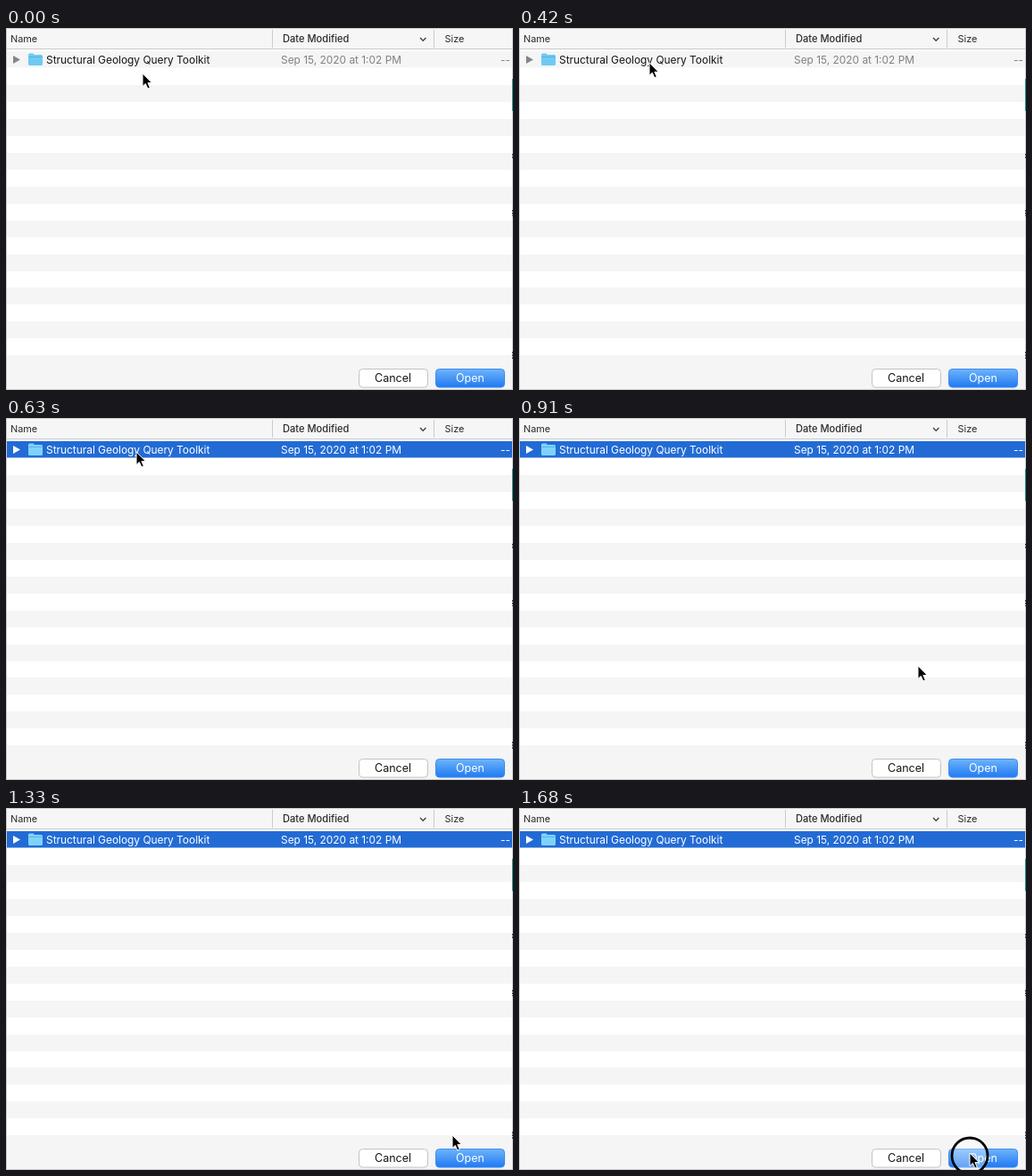
Write an HTML page that moves like this. It is 568 px wide and 406 px high and loops after 1.75 s.

```html
<!DOCTYPE html>
<html lang="en">
<head>
<meta charset="utf-8">
<title>Open folder dialog</title>
<style>
  html, body { margin: 0; width: 100%; height: 100%; overflow: hidden; background: #fff; }
  svg { display: block; font: 11.9px Inter, "Open Sans", sans-serif; fill: #151515; }
  .head { font-size: 10.9px; fill: #2b2b2b; }
  .sorted { font-size: 11.1px; font-weight: 500; }
  .button { font-size: 12.5px; text-anchor: middle; }
  .band { fill: #f5f5f5; }
  .arrow { fill: #858585; }
  .meta { fill: #808080; }
  .folder { fill: #6fcaf2; }
  .selected .band { fill: #226bd5; }
  .selected text, .selected .arrow { fill: #fff; }
  .selected .folder { fill: #7fd3fa; }
</style>
</head>
<body>
<svg width="568" height="406" viewBox="0 0 568 406">
  <defs>
    <linearGradient id="blue" x1="0" y1="0" x2="0" y2="1">
      <stop offset="0" stop-color="#6eb4fa"/>
      <stop offset="1" stop-color="#2079f3"/>
    </linearGradient>
  </defs>
  <rect width="568" height="406" fill="#fff"/>
  <g id="stripes"></g>

  <rect width="568" height="23" fill="#f6f6f6"/>
  <path d="M0 .5H568M0 23.5H568M298.5 2V22M479.5 2V22" stroke="#cbcbcb"/>
  <text class="head" x="5" y="16">Name</text>
  <text class="head sorted" x="310" y="16">Date Modified</text>
  <text class="head" x="491.5" y="16">Size</text>
  <path d="M464 11l3.2 3.3 3.2-3.3" fill="none" stroke="#444" stroke-width="1.4"/>

  <g id="row">
    <rect class="band" x="1" y="26" width="566" height="18.5"/>
    <path class="arrow" d="M8 31L16 35.5L8 40Z"/>
    <path class="folder" d="M25 30q0-1.5 1.5-1.5h4l1.5 1.5h7.5q1.5 0 1.5 1.5v9q0 1.500-1.500 1.500h-13q-1.500 0-1.500-1.500z"/>
    <path d="M25.500 32.500h15" stroke="#4aaedd" stroke-width=".8"/>
    <text x="45" y="40">Structural Geology Query Toolkit</text>
    <text class="meta" x="308" y="40">Sep 15, 2020 at 1:02 PM</text>
    <text class="meta" x="565" y="40" text-anchor="end">--</text>
  </g>

  <rect y="373" width="568" height="33" fill="#f5f5f5"/>
  <rect x="395.500" y="382.500" width="77" height="20.500" rx="4" fill="#fff" stroke="#c2c2c2"/>
  <rect x="481.500" y="382.500" width="77" height="20.500" rx="4" fill="url(#blue)" stroke="#3e8cf0"/>
  <text class="button" x="433.500" y="397">Cancel</text>
  <text class="button" x="520" y="397" fill="#fff">Open</text>

  <path d="M.5 0V406M567.500 0V406M0 405.500H568" stroke="#c9c9c9"/>
  <path d="M567.500 57V93" stroke="#178c8c"/>
  <path d="M567.500 141v6M567.500 204v7M567.500 363v8" stroke="#444" stroke-dasharray="2 1"/>

  <circle id="ring" r="20" fill="#fff" fill-opacity=".3" stroke="#000" stroke-width="2.800"/>
  <path id="cursor" d="M0 0V14.500L3.300 11.400L5.800 17L8.300 15.900L5.900 10.500H10.300Z"
        fill="#000" stroke="#fff" stroke-width="1"/>
</svg>
<script>
const LOOP = 1750, STEP = 70, SELECT_AT = 630;
const clicks = [{ at: 560, x: 146, y: 40 }, { at: 1680, x: 505, y: 390 }];

// time, x, y of the pointer tip
const path = [
  [0, 153, 51], [70, 151, 47], [140, 148, 43], [210, 147, 41],
  [350, 146, 39], [630, 146, 38], [700, 160, 50], [770, 255, 126],
  [840, 365, 214], [910, 447, 278], [980, 479, 314], [1120, 494, 346],
  [1330, 500, 367], [1470, 504, 380], [1610, 505, 387], [1750, 505, 387]
];

const $ = id => document.getElementById(id);
const row = $('row'), ring = $('ring'), cursor = $('cursor');

function drawStripes() {
  let html = '';
  for (let y = 64; y < 373; y += 37.9) {
    html += `<rect class="band" x="1" y="${Math.round(y)}" width="566" height="19"/>`;
  }
  $('stripes').innerHTML = html;
}

function pointerAt(t) {
  const i = path.findIndex(p => p[0] > t);
  const [t0, x0, y0] = path[i - 1], [t1, x1, y1] = path[i];
  const k = (t - t0) / (t1 - t0);
  return [x0 + (x1 - x0) * k, y0 + (y1 - y0) * k];
}

function render(now) {
  const t = Math.floor((now % LOOP) / STEP) * STEP;
  const click = clicks.find(c => c.at === t);
  row.setAttribute('class', t >= SELECT_AT ? 'selected' : '');
  cursor.setAttribute('transform', `translate(${pointerAt(t)})`);
  ring.style.display = click ? '' : 'none';
  if (click) ring.setAttribute('transform', `translate(${click.x},${click.y})`);
}

drawStripes();
const start = performance.now();
function tick() {
  render(performance.now() - start);
  requestAnimationFrame(tick);
}
tick();
</script>
</body>
</html>
```
